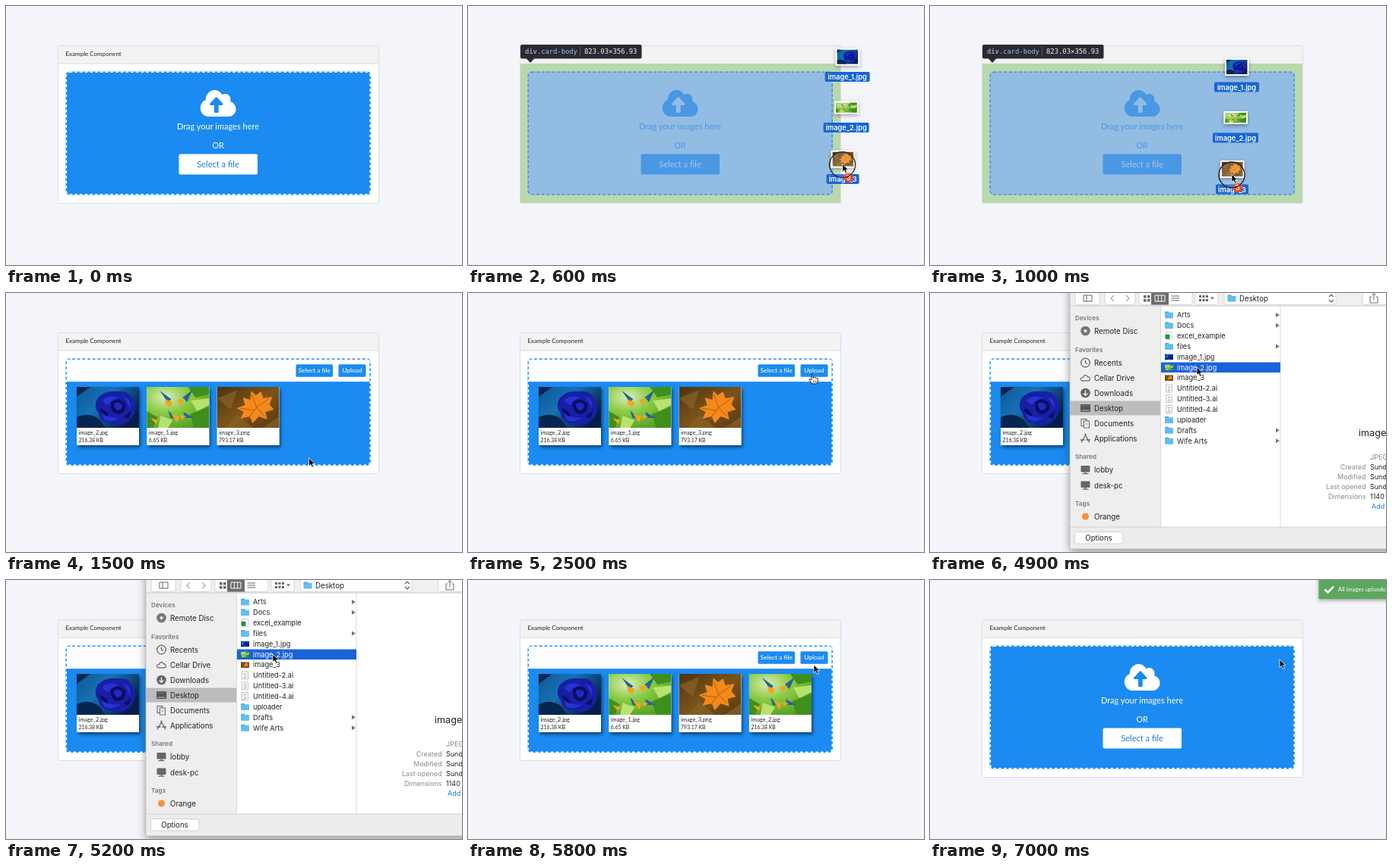
These frames come from a looping animation (600 px wide and 342 px high, 7100 ms). An HTML page:

```html
<!DOCTYPE html>
<html lang="en">
<head>
<meta charset="utf-8">
<title>Image uploader</title>
<style>
html, body { margin: 0; height: 100%; overflow: hidden; background: #f4f5fa; }
svg { display: block; }
#stage { width: 100vw; height: 100vh; }
text { font-family: Lato, sans-serif; white-space: pre; }
.mac { font-family: Inter, sans-serif; }
.mono { font-family: "DejaVu Sans Mono", monospace; }
</style>
</head>
<body>
<svg id="stage" viewBox="0 0 600 342">
  <defs>
    <linearGradient id="sea" x2="1" y2=".6"><stop stop-color="#0d5794"/><stop offset=".45" stop-color="#1672b4"/><stop offset="1" stop-color="#071d48"/></linearGradient>
    <radialGradient id="lawn" cx=".3" cy=".25" r=".9"><stop stop-color="#d9edbb"/><stop offset=".4" stop-color="#8ccb45"/><stop offset="1" stop-color="#4b9a1d"/></radialGradient>
    <linearGradient id="soil" x2="1" y2="1"><stop stop-color="#4d330f"/><stop offset=".5" stop-color="#7b5219"/><stop offset="1" stop-color="#5a3a12"/></linearGradient>
    <filter id="drop" x="-20%" y="-20%" width="150%" height="150%"><feDropShadow dx="2" dy="3" stdDeviation="2" flood-opacity=".5"/></filter>
    <filter id="soft" x="-30%" y="-30%" width="160%" height="170%"><feDropShadow dx="0" dy="2" stdDeviation="2.5" flood-opacity=".35"/></filter>
    <filter id="glow" x="-5%" y="-5%" width="110%" height="115%"><feDropShadow dx="0" dy="4" stdDeviation="6" flood-opacity=".4"/></filter>
    <clipPath id="side"><path d="M184 0H304V309H184Z"/></clipPath>
    <symbol id="rose" viewBox="0 0 82 54" preserveAspectRatio="none">
      <path fill="url(#sea)" d="M0 0H82V54H0Z"/>
      <path fill="#06264f" d="M0 40Q16 32 30 43L38 54H0ZM0 0H18L0 13Z"/>
      <path fill="#1720a5" d="M28 14Q38 4 53 6 70 4 74 18 81 28 73 40 62 55 45 48 31 48 29 35 21 25 28 14Z"/>
      <path fill="#2634d6" d="M34 17Q45 9 56 15 49 14 42 23 37 24 34 17ZM61 13Q73 16 70 29 67 19 61 13ZM33 33Q44 43 57 40 46 49 36 43Z"/>
      <path fill="#0b0d66" d="M45 20Q55 12 64 22 66 34 55 36 44 35 45 20ZM30 28Q40 30 42 39 32 37 30 28ZM62 39 72 31 68 42Z"/>
      <path fill="#2029bc" d="M49 22Q55 18 60 24 60 31 53 31 49 28 49 22Z"/>
    </symbol>
    <symbol id="birds" viewBox="0 0 82 54" preserveAspectRatio="none">
      <path fill="url(#lawn)" d="M0 0H82V54H0Z"/>
      <path fill="#3f8f1c" d="M0 32 14 40 8 54H0ZM54 0H82V10L64 14ZM57 36 82 26V54H62Z"/>
      <path fill="#b8e26e" d="M58 18 82 15V24L66 32ZM18 38 34 44 28 54H15Z"/>
      <g fill="#24649a"><path d="M17 5 32 16 28 21ZM47 14 60 4 53 20ZM28 31 39 42 31 41ZM48 33 62 41 50 41Z"/></g>
      <g fill="#f1a51f"><path d="M24 16 34 20 31 27 25 23ZM40 17 50 15 44 25ZM32 36 43 39 40 47ZM5 41 15 44 12 49ZM44 37 52 39 45 43Z"/></g>
    </symbol>
    <symbol id="leaf" viewBox="0 0 82 54" preserveAspectRatio="none">
      <path fill="url(#soil)" d="M0 0H82V54H0Z"/>
      <path fill="#8c6a28" opacity=".6" d="M0 15 27 4 18 30ZM10 54 28 37 47 54ZM60 54 82 39V54Z"/>
      <path fill="#f28a1c" d="M45 5 51 11 58 6 61 15 73 13 69 23 75 30 64 33 66 43 55 39 47 48 43 39 31 42 35 33 26 28 37 24 34 14 44 17Z"/>
      <path fill="none" stroke="#c9520c" d="M39 45 52 27 68 16M52 27 46 10M52 27 63 39M49 31 30 28"/>
    </symbol>
  </defs>
  <g id="scene"></g>
</svg>
<script>
const LOOP = 7100, BLUE = '#1b8bf1';
const scene = document.getElementById('scene');
const clamp = v => Math.max(0, Math.min(1, v));
const box = (x, y, w, h, fill, more = '') => `<rect x="${x}" y="${y}" width="${w}" height="${h}" fill="${fill}" ${more}/>`;
const path = (d, fill, more = '') => `<path d="${d}" fill="${fill}" ${more}/>`;
const line = (d, color, width = 1) => path(d, 'none', `stroke="${color}" stroke-width="${width}"`);
const text = (x, y, size, color, s, more = '') => `<text x="${x}" y="${y}" font-size="${size}" fill="${color}" ${more}>${s}</text>`;
const mac = (x, y, size, color, s, more = '') => text(x, y, size, color, s, 'class="mac" ' + more);
const photo = (id, x, y, w, h) => `<use href="#${id}" x="${x}" y="${y}" width="${w}" height="${h}"/>`;
const group = (x, y, body, more = '') => `<g transform="translate(${x} ${y})" ${more}>${body}</g>`;
const MID = 'text-anchor="middle"', END = 'text-anchor="end"', BOLD = 'font-weight="600"';

// time, x, y of the pointer tip
const track = [[200, 640, 188], [900, 397, 222], [1300, 397, 222], [1700, 400, 214], [2400, 453, 107],
  [2700, 453, 107], [3200, 397, 116], [4100, 397, 116], [4700, 351, 98], [5200, 351, 98],
  [5700, 455, 112], [6300, 455, 112], [6900, 460, 105], [LOOP, 460, 105]];

function pointerAt(t) {
  const i = Math.max(1, track.findIndex(k => k[0] >= t));
  const [a, ax, ay] = track[i - 1], [b, bx, by] = track[i];
  let p = clamp((t - a) / (b - a));
  p *= p * (3 - 2 * p);
  return [ax + (bx - ax) * p, ay + (by - ay) * p];
}

const arrow = path('M0 0V12L2.8 9.5 4.8 14 7 13 5 8.7H9Z', '#000', 'stroke="#fff" stroke-width=".9" transform="scale(.88)"');
const hand = path('M-1 1Q0-1 1 1V5Q3 4 3.5 5.5 5.5 4.5 6 6.3 8 5.5 8 8V10L6.5 14H-.5L-4 8.5Q-4 6.5-2 7.5L-1 8.5Z',
  '#fff', 'stroke="#111" stroke-width="1" transform="scale(.92)"') + line('M1.2 8.5V11.5M3 8.5V11.5M4.8 8.5V11.5', '#111', .6);

const cloud = 'M537.6 226.6c4.1-10.7 6.4-22.4 6.4-34.6 0-53-43-96-96-96-19.7 0-38.1 6-53.3 16.2C367 64.2 315.3 32 256 32c-88.4 0-160 71.6-160 160 0 2.7.1 5.4.2 8.1C40.2 219.8 0 273.2 0 336c0 79.5 64.5 144 144 144h368c70.7 0 128-57.3 128-128 0-61.9-44-113.6-102.4-125.4zM393 288H328v112q0 16-16 16h-48q-16 0-16-16V288h-65q-24-2-12-27L277 155q11-9 22 0L404 261q12 25-11 27z';

function card(bottom, body, green) {
  return box(68.5, 52.5, 422, bottom - 52, '#fff', 'rx="2"') +
    box(68.5, 52.5, 422, 23.5, '#f3f3f3') +
    (green ? box(68, 76, 422.5, bottom - 76, '#b9d8ac') : line('M68 76H490.5', '#dadada')) +
    box(68.5, 52.5, 422, bottom - 52, 'none', 'rx="2" stroke="#dcdcde"') +
    text(78.5, 66, 8, '#222', 'Example Component') + body;
}

const zone = (bottom, fill, dash) => box(78.5, 86.5, 401.5, bottom - 86.5, fill, 'rx="5"') +
  box(79.3, 87.3, 399.9, bottom - 88.1, 'none', `rx="4.5" stroke="${dash}" stroke-width="1.6" stroke-dasharray="3.6 3.1"`);

const prompt = (ink, button, label) =>
  path(cloud, ink, 'transform="translate(255.8 108.5) scale(.073 .078)"') +
  text(279, 163, 11, ink, 'Drag your images here', MID) +
  text(279, 188, 10.6, ink, 'OR', MID) +
  box(227.5, 195.5, 103.5, 27, button, 'rx="2"') +
  text(279, 213, 11.1, label, 'Select a file', MID);

function thumb(i, id, name, size) {
  const x = 93 + 92.3 * i;
  return box(x, 124, 82, 77, '#fff', 'filter="url(#drop)"') + photo(id, x, 124, 82, 54) +
    text(x + 2.5, 187, 7.4, '#222', name) + text(x + 2.5, 196.5, 6.9, '#222', size);
}

const files = [['rose', 'image_2.jpg', '216.38 KB'], ['birds', 'image_1.jpg', '6.65 KB'],
  ['leaf', 'image_3.png', '793.17 KB'], ['birds', 'image_2.jpg', '216.38 KB']];
const smallButton = (x, w, s) => box(x, 94.2, w, 16.6, BLUE, 'rx="1.5"') + text(x + w / 2, 105.3, 8.4, '#fff', s, MID + ' font-weight="500"');

const gallery = count => card(238, zone(228, BLUE, '#fff') + box(80.1, 88.1, 398.3, 29, '#fdfdff') +
  smallButton(381.5, 48.5, 'Select a file') + smallButton(437.5, 36, 'Upload') +
  files.slice(0, count).map((f, i) => thumb(i, ...f)).join(''));

const tooltip = () => path('M76 68.5H88L82 75Z', '#292a33') + box(69, 51, 159.5, 18.5, '#292a33', 'rx="2"') +
  text(75, 62.5, 8.8, '#9fc3e8', '<tspan fill="#a79cae" font-weight="700">div</tspan>.card-body', 'class="mono"') +
  line('M147.5 54V66', '#666874', .8) + text(153, 62.5, 8.9, '#f2f2f4', '823.03×356.93', 'class="mono"');

const dragged = (id, name, x, y, h, w) => box(x - 15.5, y, 31.5, h, '#fff', 'filter="url(#soft)"') +
  photo(id, x - 13.7, y + 1.8, 27.9, h - 3.6) + box(x - w / 2, y + (h + 40) / 2, w, 13, '#1866d2', 'rx="2"') +
  mac(x, y + h / 2 + 30, 9.2, '#fff', name, MID + BOLD);

const draggedSet = dragged('rose', 'image_1.jpg', 403.5, 69, 23, 59) + dragged('birds', 'image_2.jpg', 402, 139, 17, 60) +
  dragged('leaf', 'image_3', 397.5, 204, 23, 43) + '<circle cx="405" cy="240" r="6.3" fill="#ee4b2b"/>' +
  mac(405, 243.2, 8.5, '#fff', '3', MID + BOLD) +
  '<circle cx="397" cy="223" r="17" fill="#fff2" stroke="#222" stroke-width="1.3"/>';

const glyphs = {
  disc: '<circle r="6.3" fill="#777"/><circle r="2" fill="#eee"/>',
  clock: '<circle r="5.8" fill="none" stroke="#666" stroke-width="1.3"/>' + line('M0-3.5V0L2.6 1.5', '#666', 1.2),
  cloud: line('M-4 3.8H4Q7 3 5.5 0 4.5-1.5 3-1 1-5-2-2.5-2.5-2-3-.5-7-.3-6 2.5-5.3 3.8-4 3.8Z', '#666', 1.2),
  down: '<circle r="6.3" fill="#666"/>' + line('M0-3.5V3M-2.8.5 0 3.3 2.8.5', '#eee', 1.4),
  desk: box(-6.5, -5, 13, 10, '#555', 'rx="1"') + line('M-5 3H5', '#bbb', 1) + line('M-5-3H5', '#888', .8),
  docs: box(-5.5, -5.5, 7, 9, '#e5e5e5', 'stroke="#666"') + box(-2, -3, 7, 9, '#f2f2f2', 'stroke="#666"') + line('M0 0H3M0 2H3', '#777', .7),
  apps: line('M-5.5 5.5 1-6M5.5 5.5-1-6M-6.5 2H-1M1 2H6.5', '#666', 1.3),
  pc: box(-6, -5.5, 12, 8.5, '#666', 'rx="1"') + box(-1, 3, 2, 2, '#666') + box(-4, 4.5, 8, 1.2, '#666'),
  folder: box(-5.5, -4.5, 5.5, 3, '#46a6df', 'rx="1"') + box(-5.5, -3.3, 11, 7.8, '#62bdf2', 'rx="1"'),
  sheet: box(-4, -5, 8, 10, '#fff', 'stroke="#bbb" stroke-width=".7"') + box(-5, -2, 6, 6, '#2c8a4e'),
  art: box(-4, -5, 8, 10, '#fff', 'stroke="#aaa" stroke-width=".7"') + line('M-2-2H2M-1 0 2 2M-2 3H1', '#7890a8', .9)
};
for (const id of ['rose', 'birds', 'leaf']) glyphs[id] = photo(id, -5.5, -3.8, 11, 7.6);
const dot = color => `<circle r="4.6" fill="${color}"/>`;

const favorites = [['clock', 'Recents'], ['cloud', 'Cellar Drive'], ['down', 'Downloads'], ['desk', 'Desktop'], ['docs', 'Documents'], ['apps', 'Applications']];
const tags = [['#f9913a', 'Orange'], ['#edc235', 'Yellow'], ['#8f9fce', 'Purple'], ['#5fb344', 'Green']];
const listing = [['folder', 'Arts'], ['folder', 'Docs'], ['sheet', 'excel_example'], ['folder', 'files'], ['rose', 'image_1.jpg'],
  ['birds', 'image_2.jpg'], ['leaf', 'image_3'], ['art', 'Untitled-2.ai'], ['art', 'Untitled-3.ai'], ['art', 'Untitled-4.ai'],
  ['folder', 'uploader'], ['folder', 'Drafts'], ['folder', 'Wife Arts']];

const heading = (y, s) => mac(191, y + 3, 8.2, '#777', s, BOLD);
const place = (y, icon, s) => group(204.5, y, icon) + mac(216, y + 3.5, 9.7, '#222', s);

function sidebar(shared) {
  const top = shared ? 278 : 216, gap = shared ? 17 : 18;
  return box(184, 17, 119.5, 292, '#efeeef') + box(184, 142.5, 119.5, 19, '#bdbcbd') +
    heading(33, 'Devices') + place(50, glyphs.disc, 'Remote Disc') + heading(74.5, 'Favorites') +
    favorites.map(([g, s], i) => place(92 + 20 * i, glyphs[g], s)).join('') +
    (shared ? heading(216, 'Shared') + place(233.5, glyphs.pc, 'lobby') + place(254, glyphs.pc, 'desk-pc')
      : mac(295.5, 219, 8.2, '#777', 'Hide', END + BOLD)) + heading(top, 'Tags') +
    tags.map(([c, s], i) => place(top + gap + 20 * i, dot(c), s)).join('');
}

function toolbar() {
  const button = (x, w) => box(x, -3, w, 18.5, '#fff', 'rx="3" stroke="#cfcfcf" stroke-width=".8"');
  return box(184, -30, 430, 47, '#f1f0f1') + line('M184 17H610', '#c9c9c9') +
    button(191, 32) + button(230, 40) + button(275, 70) + button(349, 30) + button(387, 147) + button(569, 40) +
    box(291, -3, 23, 18.5, '#6b6b6b') +
    line('M202 3H213V11H202ZM206 3V11', '#666') + line('M242 3 238 7 242 11M258 3 262 7 258 11', '#aaa', 1.2) +
    path('M281 3h3.5v3.5h-3.5zm5 0h3.5v3.5h-3.5zm-5 5h3.5v3.5h-3.5zm5 0h3.5v3.5h-3.5zM354 3h3v3h-3zm4.5 0h3v3h-3zm4.5 0h3v3h-3zM354 8h3v3h-3zm4.5 0h3v3h-3zm4.5 0h3v3h-3zM369 5.5h5l-2.5 3z', '#666') +
    line('M296 3H309V11H296ZM300.3 3V11M304.7 3V11', '#fff') + line('M317.5 4H328M317.5 7H328M317.5 10H328', '#666', 1.1) +
    group(397, 7, glyphs.folder) + mac(407, 10.5, 9.7, '#222', 'Desktop') +
    line('M525 5 528 2 531 5M525 9 528 12 531 9', '#555', 1.1) + line('M581 5H579V13H589V5H587M584 9V1M581.5 3 584 .5 586.5 3', '#666');
}

function rows(selected) {
  return (selected ? box(304, 91.5, 157, 13.5, '#1a63d9') : '') + listing.map(([g, s], i) => {
    const y = 29 + 13.85 * i, on = selected && i === 5;
    return group(314.5, y, glyphs[g]) + mac(325, y + 3.3, 9.2, on ? '#fff' : '#222', s) +
      (g === 'folder' && s !== 'uploader' ? path(`M455 ${y - 3}l5 3-5 3z`, '#777') : '');
  }).join('');
}

const facts = [['Created', 'Sunday, 8 April'], ['Modified', 'Sunday, 8 April'], ['Last opened', 'Sunday, 8 April'], ['Dimensions', '1140 × 760']];
const preview = () => mac(564, 189, 12.6, '#222', 'image_2.jpg') + mac(579, 219.5, 9, '#888', 'JPEG image') +
  facts.map(([k, v], i) => mac(573.5, 232.7 + 13 * i, 9, '#888', k, END) + mac(579, 232.7 + 13 * i, 9, '#222', v)).join('') +
  mac(581, 285, 9, '#1a7be0', 'Add Tags…');

function sheet(t) {
  const selected = t >= 4700;
  return box(184, -30, 440, 368, '#fff', 'filter="url(#glow)"') + `<g clip-path="url(#side)">${sidebar(t >= 4200)}</g>` +
    toolbar() + line('M303.5 17V309M461 17V309', '#d9d9d9') +
    (t >= 3900 ? rows(selected) : '') + (selected ? preview() : '') +
    box(184, 309, 440, 29, '#ededed') + line('M184 309H600', '#d2d2d2') + line('M184 -30V338H600', '#bbb', .8) +
    box(190.5, 315.5, 63.5, 15.5, '#fff', 'rx="3" stroke="#c9c9c9" stroke-width=".8"') + mac(222, 326.7, 9.7, '#222', 'Options', MID);
}

const toast = () => box(511.5, -10, 100, 35, '#5ba65d', 'filter="url(#soft)"') +
  line('M519.5 12.5 523.5 16.5 531 8.5', '#fff', 2.6) + text(537, 15, 7.6, '#fff', 'All images uplaoded successfully');

function draw(t) {
  const [x, y] = pointerAt(t), during = (a, b) => t >= a && t < b;
  let out;
  if (during(500, 1300)) out = card(260, zone(249.5, '#93bce3', '#468fe2') + prompt('#4a97e3', '#4a97e3', '#a5caee'), true) + tooltip();
  else if (during(1300, 6100)) out = gallery(t < 5500 ? 3 : 4);
  else out = card(260, zone(249.5, BLUE, '#fff') + prompt('#fff', '#fff', '#2379d4'));
  if (during(200, 1300)) out += group(x - 397, y - 222, draggedSet);
  if (during(3400, 5600)) {
    const open = 1 - clamp((t - 3400) / 400), close = clamp((t - 5200) / 400);
    out += group(0, -360 * (open * open + close * close), sheet(t));
  }
  if (t >= 6200) out += group(0, -30 * (1 - clamp((t - 6100) / 300)), toast());
  if (t >= 200) out += group(x, y, during(2300, 3900) || during(5900, 6100) ? hand : arrow);
  scene.innerHTML = out;
}

let shown = -1;
function tick(now) {
  const t = Math.floor(now % LOOP / 100) * 100;
  if (t !== shown) draw(shown = t);
  requestAnimationFrame(tick);
}
draw(0);
requestAnimationFrame(tick);
</script>
</body>
</html>
```
